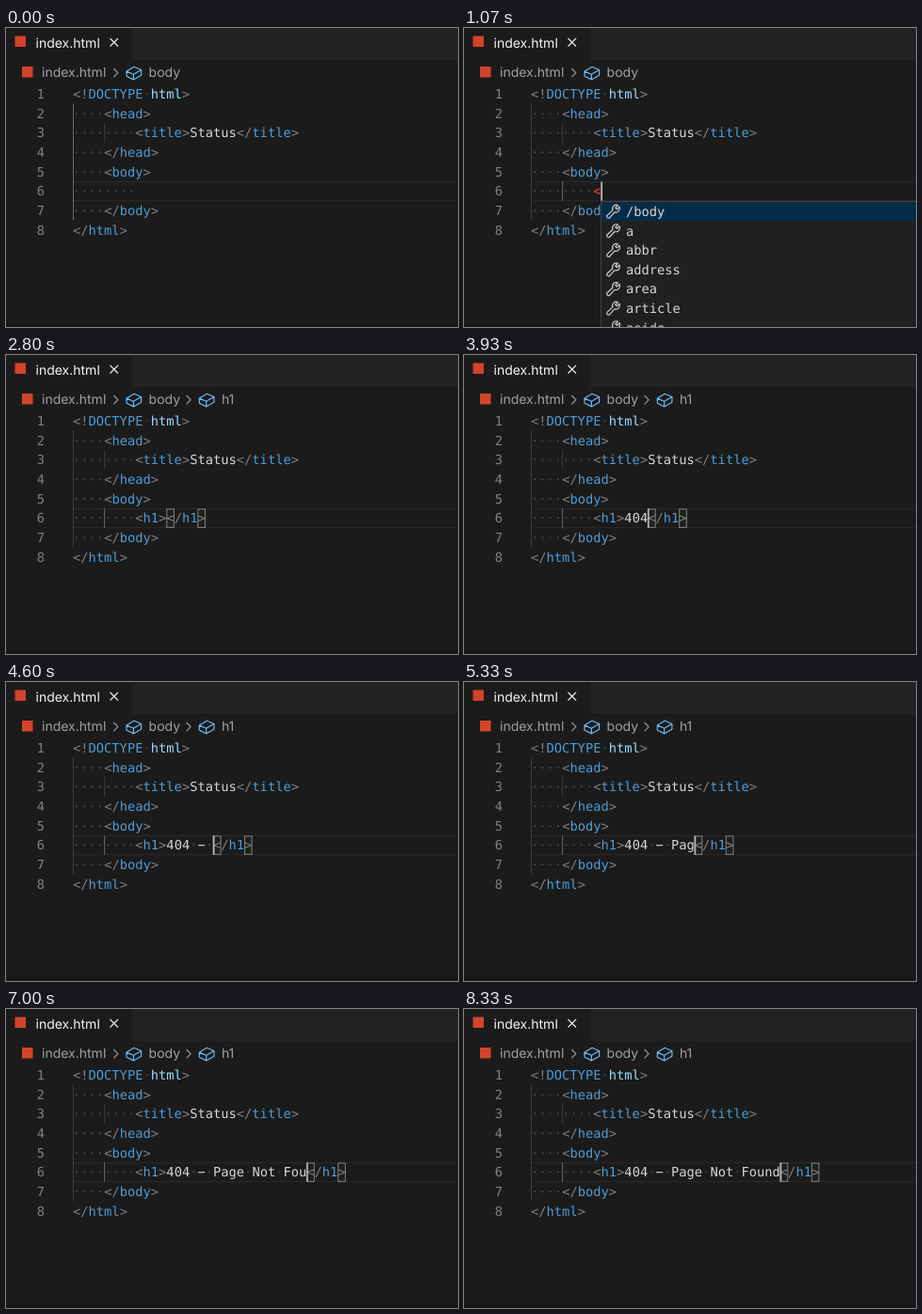
Write an HTML page that moves like this. It is 480 by 318 pixels and loops after 8.67 s.

```html
<!DOCTYPE html>
<html lang="en">
<head>
<meta charset="utf-8">
<title>Editor typing</title>
<style>
  html, body { margin: 0; width: 100%; height: 100%; overflow: hidden; background: #1b1b1b; }
  svg { display: block; width: 480px; height: 318px; text-rendering: geometricPrecision; }
  .code { font: 13.74px "DejaVu Sans Mono", monospace; fill: #d6d6d6; }
  .ui { font: 14px Inter, sans-serif; fill: #a0a0a0; }
  .line { fill: none; stroke-width: 1.2; stroke-linejoin: round; }
</style>
</head>
<body>
<svg id="stage" viewBox="0 0 480 318"></svg>
<script>
const LOOP = 8670, BLINK = 530;
const LEFT = 71, CHAR = 8.272, ROW = 20.65, TOP = 59.9;
const GRAY = '#808080', BLUE = '#4f9cd6', PALE = '#9cdcfe', RED = '#f0433a', DOT = '#454545';

// Each step: time, text typed on line 6, suggestions shown
const steps = [
  [-BLINK, ''],
  [1000, '<'],
  [1070, '<', '/body a abbr address area article aside'],
  [1530, '<h', 'h1 h2 h3 h4 h5 h6 head'],
  [1800, '<h1', 'h1'],
  [2270, '<h1>'],
  [3270, '<h1>4'],
  [3670, '<h1>40'],
  [3870, '<h1>404'],
  [4200, '<h1>404 '],
  [4470, '<h1>404 −'],
  [4530, '<h1>404 −', '−'],
  [4600, '<h1>404 − '],
  [4930, '<h1>404 − P'],
  [5000, '<h1>404 − P', 'P Param Picture Pre Progress Pri:d Pri:dev'],
  [5130, '<h1>404 − Pa', 'Param'],
  [5270, '<h1>404 − Pag'],
  [5400, '<h1>404 − Page'],
  [5530, '<h1>404 − Page '],
  [5800, '<h1>404 − Page N'],
  [5870, '<h1>404 − Page N', 'Nav Noframes Noscript'],
  [6000, '<h1>404 − Page No', 'Noframes Noscript'],
  [6200, '<h1>404 − Page Not'],
  [6270, '<h1>404 − Page Not '],
  [6600, '<h1>404 − Page Not F'],
  [6670, '<h1>404 − Page Not F', 'Fieldset Figcaption Figure Font Footer Form Form:get'],
  [6800, '<h1>404 − Page Not Fo', 'Font Footer Form Form:get Form:post'],
  [7000, '<h1>404 − Page Not Fou'],
  [7200, '<h1>404 − Page Not Foun'],
  [7270, '<h1>404 − Page Not Found']
];

const lineTop = n => TOP + (n - 1) * ROW;
const colX = col => LEFT + col * CHAR;
const esc = s => s.replace(/</g, '&lt;').replace(/>/g, '&gt;');
const span = (s, fill, extra = '') => `<tspan fill="${fill}" ${extra}>${esc(s)}</tspan>`;
const text = (x, y, body, cls, fill = '') =>
  `<text class="${cls}" x="${x}" y="${y}" ${fill && `fill="${fill}" style="fill:${fill}"`}>${body}</text>`;
const rect = (x, y, w, h, fill) => `<rect x="${x}" y="${y}" width="${w}" height="${h}" fill="${fill}"/>`;
const path = (d, stroke, move = '0 0') =>
  `<path class="line" d="${d}" stroke="${stroke}" transform="translate(${move})"/>`;

function paint(line) {
  if (line.trim() === '<') return span(line.replace(/[^ ]/, '').replace(/ /g, '·'), DOT) + span('<', RED);
  let inTag = false;
  return line.replace(/(<[!\/]?)(\w*)|(>)|( )|([^<> ]+)/g, (all, open, name, close, space) => {
    if (open) { inTag = true; return span(open, GRAY) + span(name, BLUE); }
    if (close) { inTag = false; return span('>', GRAY); }
    if (space) return span('·', DOT);
    return span(all, inTag ? PALE : '#d6d6d6');
  });
}

const chevron = x => path('M0 0L4.5 4.7L0 9.4', '#9a9a9a', `${x} 43`);
const cube = x => path('M0 5.6L8 .8L15.6 4V9.8L7.4 14.4L0 10.8ZM0 5.6L7.4 8.8L15.6 4M7.4 8.8V14.4',
  '#6cbaf2', `${x} 40.5`);
const crumb = (x, name) => chevron(x) + cube(x + 13.7) + text(x + 37.3, 52, name, 'ui');
const wrench = (x, y) => path(
  'M14.6 3.2L11.9 5.8L10.3 4.3L12.9 1.6A4.2 4.2 0 0 0 7.4 7L1.4 12.5A1.9 1.9 0 0 0 4 15L9.5 9A4.2 4.2 0 0 0 14.6 3.2Z',
  '#cfcfcf', `${x} ${y}`);

function chrome(t) {
  const tag = t >= 2130 ? 'h1' : t >= 1330 ? '?' : '';
  return rect(0, 0, 480, 318, '#1b1b1b') + rect(134, 0, 346, 34, '#222223') +
    rect(0, 314.5, 480, 3.5, '#161616') +
    rect(9.5, 8.5, 11.5, 11.5, '#d3432b') + rect(17, 41, 11.5, 11.5, '#d3432b') +
    text(31.5, 20.5, 'index.html', 'ui', '#f4f4f4') +
    path('M110.5 11L119 19.5M119 11L110.5 19.5', '#e8e8e8') +
    text(38, 52, 'index.html', 'ui') + crumb(114.3, 'body') + (tag && crumb(191.6, tag));
}

function popup(list, typed) {
  const words = list.split(' '), prefix = typed.match(/[^\s<>]*$/)[0].length;
  const x = typed.includes('>') ? 152.5 : 145.5, y = 184.5;
  let out = `<rect x="${x}" y="${y}" width="400" height="${words.length * 20.6}" fill="#202021" stroke="#414141"/>` +
    rect(x + .5, y + .5, 400, 20.3, '#052c47');
  words.forEach((word, i) => {
    const top = y + i * 20.6;
    out += wrench(x + 5, top + 2.4) + text(x + 26.5, top + 15.4,
      span(word.slice(0, prefix), '#22a2f8', 'font-weight="bold"') + esc(word.slice(prefix)), 'code');
  });
  return out;
}

function scene(t) {
  const now = steps.findLast(s => s[0] <= t), typed = now[1];
  const since = t - steps.find(s => s[1] === typed)[0];
  const closed = t >= 2340, end = colX(8 + typed.length), y6 = lineTop(6);
  const lines = ['<!DOCTYPE html>', '    <head>', '        <title>Status</title>', '    </head>', '    <body>',
    '        ' + typed + (closed ? '</h1>' : ''), '    </body>', '</html>'];

  let out = chrome(t) + rect(LEFT, y6, 409, 1, '#2a2a2a') + rect(LEFT, y6 + 20, 409, 1, '#2a2a2a');
  out += rect(LEFT, lineTop(2), 1, ROW * 6, typed ? '#3c3c3c' : '#6a6a6a') +
    rect(colX(4), lineTop(3), 1, ROW, '#3c3c3c');
  if (typed) out += rect(colX(4), y6, 1, ROW, '#6a6a6a');
  if (closed) for (const col of [0, 4])
    out += `<rect x="${end + col * CHAR + .5}" y="${y6 + .8}" width="7.6" height="19.4" fill="#1b211b" stroke="#858585"/>`;
  lines.forEach((line, i) => {
    const base = lineTop(i + 1) + 15.1;
    out += text(32.7, base, i + 1, 'code', '#808080') + text(LEFT, base, paint(line), 'code');
  });
  if (now[2]) out += popup(now[2], typed);
  if (since % (2 * BLINK) < BLINK && (typed || t >= BLINK)) out += rect(end - .2, y6 + .3, 1.8, 20.2, '#b4b4b2');
  return out;
}

const stage = document.getElementById('stage');
let shown = '';
function draw() {
  const next = scene(performance.now() % LOOP);
  if (next !== shown) stage.innerHTML = shown = next;
  requestAnimationFrame(draw);
}
draw();
</script>
</body>
</html>
```
